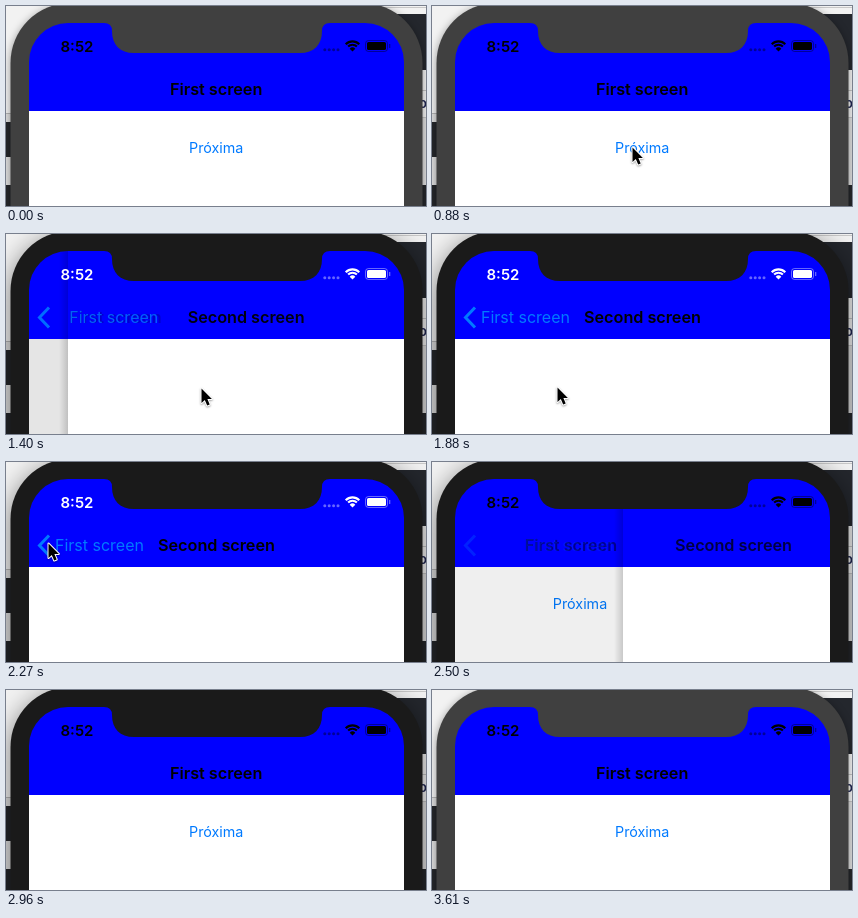
These frames come from a looping animation (420x200 px, 3710 ms). An HTML page with a canvas:

```html
<!DOCTYPE html>
<html lang="pt">
<head>
<meta charset="utf-8">
<style>
  html, body { margin: 0; width: 100%; height: 100%; overflow: hidden; background: #eee; }
  canvas { display: block; width: 420px; height: 200px; }
</style>
</head>
<body>
<canvas id="stage" width="420" height="200"></canvas>
<script>
const ctx = document.getElementById('stage').getContext('2d');
const LOOP = 3710;
const LEFT = 23, TOP = 17, WIDTH = 375, BAR_BOTTOM = 105;
const BLUE = '#0000ff', TINT = '#007aff';
const PUSH = 1140, POP = 2417;

const span = (from, to, count) =>
  Array.from({ length: count }, (_, i) => Math.round((from + (to - from) * i / (count - 1)) / 10) * 10);

const ticks = [0, 530, 590, 650, 820, 880, 1060, 1170, ...span(1230, 1640, 8),
  ...span(1880, 2380, 10), ...span(2440, 2960, 10), 3560, 3610];

// [time, x, y] of the pointer tip; no position means hidden
const pointerPath = [[0], [530, 201, 157], [590, 201, 143], [650, 201, 134], [820, 200, 138],
  [880, 200, 141], [1170, 197, 151], [1230, 195, 156], [1290, 195, 154],
  [1880, 125, 153], [1930, 88, 129], [1990, 62, 106], [2050, 48, 90], [2100, 43, 83],
  [2160, 42, 81], [2440]];

const lastBefore = (list, t, key = v => v) => list.filter(v => key(v) <= t).pop();

// Critically damped spring lasting half a second
function spring(ms) {
  if (ms <= 0) return 0;
  if (ms >= 500) return 1;
  const x = 18.26 * ms / 1000;
  return 1 - (1 + x) * Math.exp(-x);
}

function withAlpha(alpha, draw) {
  ctx.save();
  ctx.globalAlpha *= Math.max(0, Math.min(1, alpha));
  draw();
  ctx.restore();
}

function rect(color, x, y, w, h) {
  ctx.fillStyle = color;
  ctx.fillRect(x, y, w, h);
}

function round(color, x, y, w, h, r) {
  ctx.fillStyle = color;
  ctx.beginPath();
  ctx.roundRect(x, y, w, h, r);
  ctx.fill();
}

function label(text, x, y, size, weight, color, alpha = 1) {
  withAlpha(alpha, () => {
    ctx.font = `${weight} ${size}px Inter, sans-serif`;
    ctx.fillStyle = color;
    ctx.fillText(text, x, y);
  });
}

function drawDesktop() {
  rect('#f2f2f2', 0, 0, 420, 200);
  rect('#b4b4b4', 0, 107, 10, 1);
  rect('#dedede', 0, 108, 10, 92);
  round('#25272b', -6, 116, 20, 35, 3);
  rect('#25272b', 0, 179, 10, 21);
  rect('#c8c8c8', 370, 1, 50, 1);
  rect('#24272d', 370, 8, 50, 28);
  round('#24272d', 400, 36, 30, 28, 3);
  rect('#c4c4c4', 410, 84, 10, 1);
  label('o', 413, 102, 13, 600, '#1c2350');
  rect('#c4c4c4', 410, 111, 10, 1);
  rect('#dedede', 410, 112, 10, 67);
  rect('#25272b', 410, 179, 10, 21);
}

function drawBezel(focus) {
  const shade = Math.round(64 - 38 * focus);
  const color = `rgb(${shade},${shade},${shade})`;
  ctx.save();
  ctx.shadowColor = `rgba(0,0,0,${0.4 + 0.1 * focus})`;
  ctx.shadowBlur = 8 + 18 * focus;
  ctx.shadowOffsetY = 2 + 4 * focus;
  round(color, 4.5, -3, 412, 300, 60);
  ctx.restore();
  return color;
}

function drawNotch(color) {
  ctx.fillStyle = color;
  ctx.beginPath();
  ctx.moveTo(98, 16);
  ctx.lineTo(98, 17);
  ctx.quadraticCurveTo(106, 17, 106, 25);
  ctx.bezierCurveTo(106, 39, 114, 47, 128, 47);
  ctx.lineTo(294, 47);
  ctx.bezierCurveTo(308, 47, 316, 39, 316, 25);
  ctx.quadraticCurveTo(316, 17, 324, 17);
  ctx.lineTo(324, 16);
  ctx.fill();
}

function drawStatus(color) {
  label('8:52', 54.5, 45.5, 15, 600, color);
  ctx.fillStyle = ctx.strokeStyle = color;
  withAlpha(0.4, () => {
    for (let i = 0; i < 4; i++) {
      ctx.beginPath();
      ctx.arc(318.8 + i * 4.4, 43.8, 1.5, 0, 7);
      ctx.fill();
    }
    ctx.lineWidth = 1;
    ctx.beginPath();
    ctx.roundRect(359.5, 34.5, 22, 11, 3);
    ctx.stroke();
    ctx.fillRect(383, 38, 1.3, 4);
  });
  round(color, 361, 36, 19, 8, 1.6);

  const angle = Math.PI / 4;
  ctx.lineWidth = 2.1;
  for (const r of [9.6, 6.2]) {
    ctx.beginPath();
    ctx.arc(346.5, 45, r, -Math.PI / 2 - angle, -Math.PI / 2 + angle);
    ctx.stroke();
  }
  ctx.beginPath();
  ctx.moveTo(346.5, 45.5);
  ctx.arc(346.5, 45.5, 4, -Math.PI / 2 - angle, -Math.PI / 2 + angle);
  ctx.fill();
}

function drawChevron(alpha) {
  withAlpha(alpha, () => {
    ctx.strokeStyle = TINT;
    ctx.lineWidth = 3;
    ctx.beginPath();
    ctx.moveTo(43, 73.5);
    ctx.lineTo(33.5, 83.5);
    ctx.lineTo(43, 93.5);
    ctx.stroke();
  });
}

function drawPages(t, shown) {
  const edge = Math.round(LEFT + WIDTH * (1 - shown));
  rect('#fff', LEFT, BAR_BOTTOM, WIDTH, 95);
  const pressed = t >= 1060 && t < 1640;
  const strength = pressed ? 0.25 + 0.75 * Math.min(1, Math.max(0, t - 1060) / 380) : 1;
  label('Próxima', 183 - 0.3 * WIDTH * shown, 147.3, 14.3, 400, TINT, strength);
  rect(`rgba(0,0,0,${0.115 * shown})`, LEFT, BAR_BOTTOM, WIDTH, 95);
  rect('#fff', edge, BAR_BOTTOM, WIDTH, 95);
  return edge;
}

function drawBar(t, popping, progress) {
  const eased = Math.pow(progress, 1.2);
  const moved = popping ? 1 - eased : eased;
  const shown = popping ? 1 - progress : progress;
  const firstX = 164 - 115 * moved;
  const held = t >= 2320 && t < 2960 ? 0.5 : 1;
  rect(BLUE, LEFT, TOP, WIDTH, BAR_BOTTOM - TOP);
  label('First screen', firstX, 89.3, 16.2, 600, '#000', popping ? progress : 1 - progress ** 2);
  label('First screen', firstX, 89.3, 16, 400, TINT, shown ** 2 * held);
  label('Second screen', 152 + 239 * (1 - moved), 89.3, 16.2, 600, '#000', Math.sqrt(shown));
  drawChevron(shown * held);
}

function drawShadow(edge) {
  const shade = ctx.createLinearGradient(edge - 9, 0, edge, 0);
  shade.addColorStop(0, 'rgba(0,0,0,0)');
  shade.addColorStop(1, 'rgba(0,0,0,0.16)');
  rect(shade, edge - 9, TOP, 9, 200 - TOP);
}

function drawPointer(x, y) {
  ctx.save();
  ctx.translate(x + 0.5, y + 0.5);
  ctx.beginPath();
  [[0, 0], [0, 14.5], [3.3, 11.5], [5.7, 17], [8.2, 16], [5.9, 10.6], [10.4, 10.4]]
    .forEach(([px, py]) => ctx.lineTo(px, py));
  ctx.closePath();
  ctx.fillStyle = '#000';
  ctx.strokeStyle = '#fff';
  ctx.lineWidth = 2;
  ctx.lineJoin = 'round';
  ctx.shadowColor = 'rgba(0,0,0,0.35)';
  ctx.shadowBlur = 2;
  ctx.shadowOffsetY = 1;
  ctx.stroke();
  ctx.shadowColor = 'transparent';
  ctx.fill();
  ctx.restore();
}

function draw(t) {
  const popping = t >= POP;
  const progress = spring(t - (popping ? POP : PUSH));
  const shown = popping ? 1 - progress : progress;
  const focus = t < 1060 || t >= 3610 ? 0 : t >= 3560 ? 0.5 : 1;

  drawDesktop();
  const bezel = drawBezel(focus);

  ctx.save();
  ctx.beginPath();
  ctx.roundRect(LEFT, TOP, WIDTH, 300, 39);
  ctx.clip();
  const edge = drawPages(t, shown);
  drawBar(t, popping, progress);
  if (shown > 0 && shown < 1) drawShadow(edge);
  drawStatus(t >= 1170 && t < 2380 ? '#fff' : '#000');
  ctx.restore();

  drawNotch(bezel);
  const [, x, y] = lastBefore(pointerPath, t, p => p[0]);
  if (x !== undefined) drawPointer(x, y);
}

const start = performance.now();
function frame() {
  draw(lastBefore(ticks, (performance.now() - start) % LOOP));
  requestAnimationFrame(frame);
}
frame();
</script>
</body>
</html>
```
